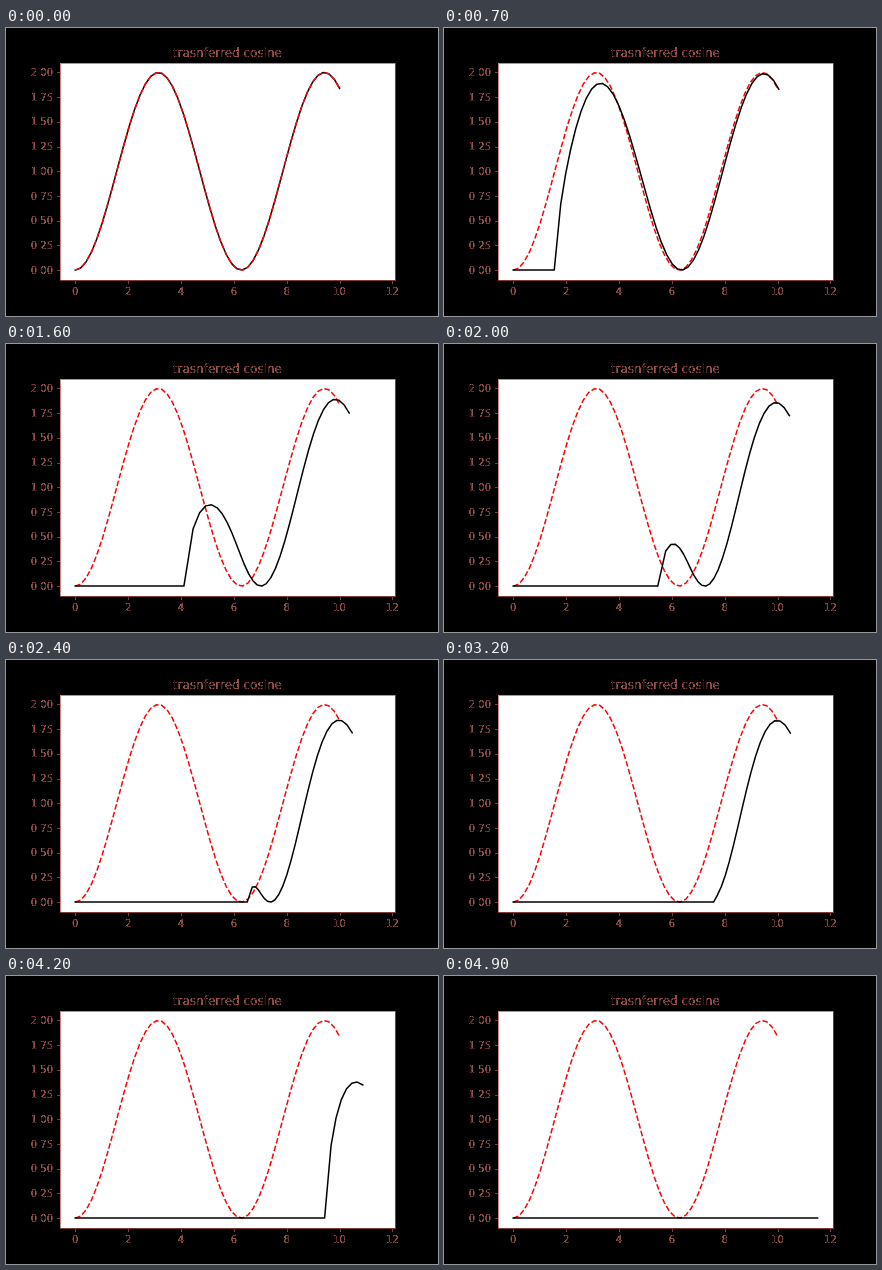
These frames come from a looping animation (432x288 px, 5 s). An HTML page with a canvas:

```html
<!DOCTYPE html>
<html lang="en">
<head>
<meta charset="utf-8">
<title>Slit maps flattening a cosine</title>
<style>
  html, body { margin: 0; width: 100%; height: 100%; overflow: hidden; background: #000; }
  canvas { display: block; }
</style>
</head>
<body>
<canvas id="stage" width="432" height="288"></canvas>
<script>
const W = 432, H = 288, STEP = 100, COUNT = 50;
const INK = [160, 84, 77];
const ctx = document.getElementById('stage').getContext('2d');

// Each step applies z -> a + sqrt((z - a)^2 + h^2), which folds the
// vertical slit from a to a + ih onto the real line.
function slit([x, y], a, h) {
  const u = x - a;
  const re = u * u - y * y + h * h, im = 2 * u * y;
  const mod = Math.hypot(re, im);
  return [
    a + Math.sqrt(Math.max(0, (mod + re) / 2)),
    Math.sqrt(Math.max(0, (mod - re) / 2))
  ];
}

const wave = Array.from({ length: COUNT }, (_, i) => {
  const x = 10 * i / (COUNT - 1);
  return [x, 1 - Math.cos(x)];
});

const poses = [wave];
for (let k = 1; k < COUNT; k++) {
  const prev = poses[k - 1];
  const [a, h] = prev[k];
  poses.push(prev.map((p, i) => i < k ? p : i === k ? [a, 0] : slit(p, a, h)));
}

// Plot area with a 5% margin around the data
const box = { l: 54, r: 388.8, t: 34.56, b: 252 };
const reach = poses[COUNT - 1][COUNT - 1][0];
const px = x => box.l + (box.r - box.l) * (x / reach + 0.05) / 1.1;
const py = y => box.b - (box.b - box.t) * (y / 2 + 0.05) / 1.1;
const snap = v => Math.round(v) + 0.5;

const xTicks = [0, 2, 4, 6, 8, 10, 12];
const yTicks = Array.from({ length: 9 }, (_, i) => i / 4);

function layer() {
  const c = document.createElement('canvas');
  c.width = W;
  c.height = H;
  return c;
}

// Lettering keeps only its soft edges; solid cores stay black.
function makeLabels() {
  const c = layer();
  const g = c.getContext('2d', { willReadFrequently: true });
  const family = '"DejaVu Sans", sans-serif';
  g.fillStyle = '#000';
  g.textAlign = 'center';
  g.font = '12px ' + family;
  g.fillText('trasnferred cosine', (box.l + box.r) / 2, 28.5);
  g.font = '10px ' + family;
  xTicks.forEach(v => g.fillText(v, px(v), 267));
  g.textAlign = 'right';
  // decimal points are swallowed by the dark ground
  yTicks.forEach(v => g.fillText(v.toFixed(2).replace('.', ' '), 47, Math.round(py(v) + 3.6)));

  const img = g.getImageData(0, 0, W, H), d = img.data;
  for (let i = 0; i < d.length; i += 4) {
    const cover = d[i + 3] / 255;
    d.set(INK, i);
    d[i + 3] = 255 * Math.min(1, 6.75 * cover * cover * (1 - cover));
  }
  g.putImageData(img, 0, 0);
  return c;
}

function makeFrame() {
  const c = layer();
  const g = c.getContext('2d');
  const l = snap(box.l), r = snap(box.r), t = snap(box.t), b = snap(box.b);
  g.fillStyle = '#000';
  g.fillRect(0, 0, W, H);
  g.fillStyle = '#fff';
  g.fillRect(l - 0.5, t - 0.5, r - l, b - t);
  // translucent: pink over the white panel, dim over black
  g.strokeStyle = 'rgba(184, 84, 76, 0.7)';
  g.lineWidth = 1;
  g.strokeRect(l, t, r - l, b - t);
  g.beginPath();
  xTicks.forEach(v => {
    g.moveTo(snap(px(v)), b + 0.5);
    g.lineTo(snap(px(v)), b + 3.5);
  });
  yTicks.forEach(v => {
    g.moveTo(l - 3.5, snap(py(v)));
    g.lineTo(l - 0.5, snap(py(v)));
  });
  g.stroke();
  g.drawImage(makeLabels(), 0, 0);
  return c;
}

function curve(points, color, cap, dash) {
  ctx.beginPath();
  points.forEach(([x, y]) => ctx.lineTo(px(x), py(y)));
  ctx.strokeStyle = color;
  ctx.lineWidth = 1.5;
  ctx.lineCap = cap;
  ctx.lineJoin = 'round';
  ctx.setLineDash(dash);
  ctx.stroke();
}

const frame = makeFrame();
const drawPose = k => curve(poses[k], '#000', 'square', []);
const drawWave = () => curve(wave, '#f00', 'butt', [5.55, 2.4]);

function draw() {
  const k = Math.floor(performance.now() / STEP) % COUNT;
  ctx.drawImage(frame, 0, 0);
  // the resting curve lies under the dashes, the moving one above
  if (k === 0) drawPose(k);
  drawWave();
  if (k > 0) drawPose(k);
  requestAnimationFrame(draw);
}
draw();
</script>
</body>
</html>
```
